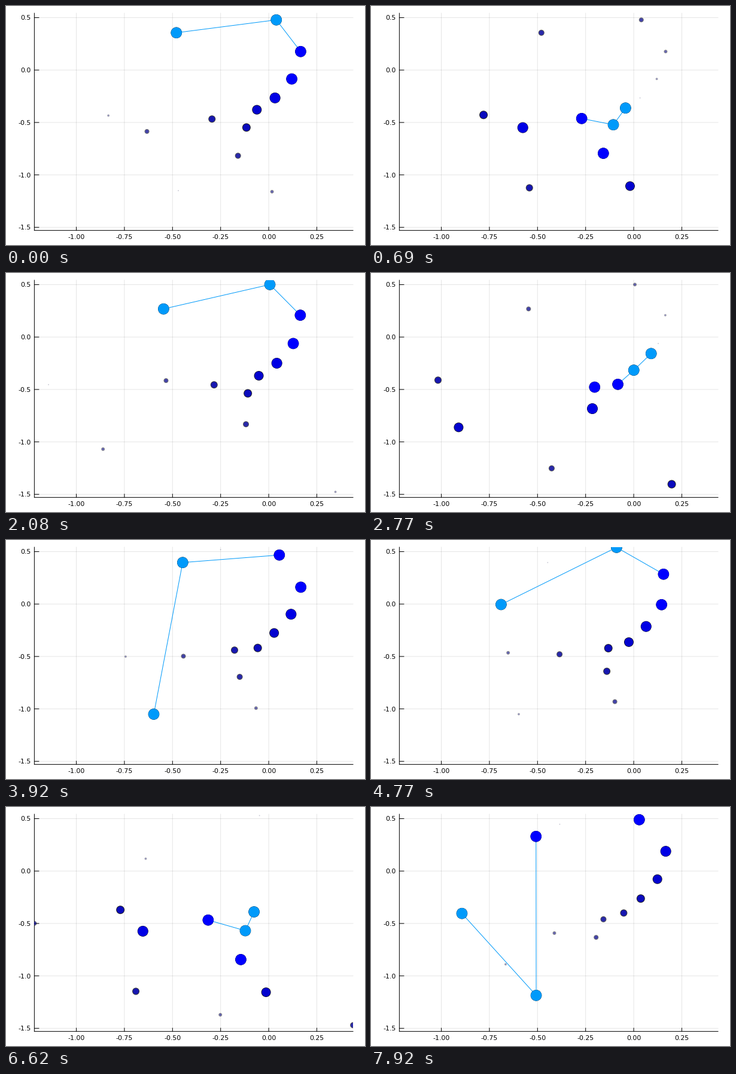
A matplotlib script that plays this animation: 600 by 400 pixels, repeating every 8 s.

```python
import numpy as np
import matplotlib.pyplot as plt
from matplotlib.animation import FuncAnimation
from matplotlib.patches import Rectangle

W, H, DPI = 600, 400, 100
STEPS, LOOP_MS, TICK_MS = 104, 8000, 20
TAIL = 13                                # points visible at once
LEFT, TOP, RIGHT, BOTTOM = 47.4, 12, 580, 375.6
ORIGIN = np.array([439.1, 107.2])        # pixel place of (0, 0)
SCALE = np.array([321.6, -175.45])       # pixels per unit
LIGHT, BLUE = (0, 154 / 255, 250 / 255), (0, 0, 1)
A, B, C, D = 0.9, -0.6013, 2.0, 0.5      # Tinkerbell map
PX = 72 / DPI

# Key points (step, x, y): the map fills in everything between them.
KEYS = [
    (-12, 288, 309), (-6, 402, 203), (0, 285, 45), (8, 425, 170.5),
    (13, 246.5, 75.5), (16, 550.5, 366), (25, 492, 70.5), (30, 502.5, 353.5),
    (36, 468, 135), (43, 391, 229), (51, 247, 291.5), (60, 489, 57),
    (65, 545, 330), (72, 484, 112), (79, 217, 308.5), (86, 414.5, 175.5),
    (94, 376, 218), (103, 152, 178),
]


def step(p):
    x, y = p
    return np.array([x * x - y * y + A * x + B * y,
                     2 * x * y + C * x + D * y])


def jacobian(p):
    x, y = p
    return np.array([[2 * x + A, -2 * y + B],
                     [2 * y + C, 2 * x + D]])


def fit_orbit(rounds=20, stiff=1e4):
    """Gauss-Newton: the orbit of the map that passes the key points."""
    count = STEPS + TAIL - 1
    keys = {k + TAIL - 1: ((x, y) - ORIGIN) / SCALE for k, x, y in KEYS}
    orbit = np.zeros((count, 2))
    for i in range(count):
        orbit[i] = keys[i] if i in keys else step(orbit[i - 1])

    rows = 2 * (count - 1)
    weight = np.abs(SCALE)
    for _ in range(rounds):
        mat = np.zeros((rows + 2 * len(keys), 2 * count))
        res = np.zeros(len(mat))
        for i in range(count - 1):
            r = slice(2 * i, 2 * i + 2)
            mat[r, 2 * i:2 * i + 2] = -stiff * jacobian(orbit[i])
            mat[r, 2 * i + 2:2 * i + 4] = stiff * np.eye(2)
            res[r] = stiff * (orbit[i + 1] - step(orbit[i]))
        for n, (i, p) in enumerate(keys.items()):
            r = slice(rows + 2 * n, rows + 2 * n + 2)
            mat[r, 2 * i:2 * i + 2] = np.diag(weight)
            res[r] = weight * (orbit[i] - p)
        orbit += np.linalg.lstsq(mat, -res, rcond=None)[0].reshape(-1, 2)
    return ORIGIN + SCALE * orbit


def disc_style(ages):
    """Sizes and colours: for each point a black disc, then its fill."""
    sizes, colors = [], []
    for age in ages:
        t = min(1, (TAIL - age) / 10)
        radius = min(9.3, 10 * t)
        ring = min(0.15 + 3 * (1 - t), 1, 0.4 * radius)
        fill = LIGHT if age < 2 else BLUE
        sizes += [(2 * r * PX) ** 2 for r in (radius, radius - ring)]
        colors += [(0, 0, 0, 1 - (1 - t) ** 1.6), (*fill, t)]
    return sizes, colors


def rule(x, y, alpha=1):
    ax.plot(x, y, color="black", alpha=alpha, lw=PX, zorder=1 + alpha)


def draw_axes():
    font = dict(family="DejaVu Sans", fontsize=11 * PX, va="baseline")
    for v in np.arange(-1, 0.26, 0.25):
        x = ORIGIN[0] + SCALE[0] * v
        rule([x, x], [TOP, BOTTOM], 0.1)
        rule([x, x], [BOTTOM, BOTTOM - 5.5])
        ax.text(x, 390.4, f"{v:.2f}", ha="center", **font)
    for v in np.arange(-1.5, 0.51, 0.5):
        y = ORIGIN[1] + SCALE[1] * v
        rule([LEFT, RIGHT], [y, y], 0.1)
        rule([LEFT, LEFT + 7.5], [y, y])
        ax.text(41.6, y + 4, f"{v:.1f}", ha="right", **font)
    rule([LEFT, LEFT], [TOP, BOTTOM])
    rule([LEFT, RIGHT], [BOTTOM, BOTTOM])


plt.rcParams["path.snap"] = False
fig = plt.figure(figsize=(W / DPI, H / DPI), dpi=DPI, facecolor="white")
ax = fig.add_axes([0, 0, 1, 1])
ax.set_xlim(0, W)
ax.set_ylim(H, 0)
ax.set_autoscale_on(False)
ax.axis("off")
draw_axes()

orbit = fit_orbit()
ages = [1, 0, *range(TAIL - 1, 1, -1)]   # drawing order
sizes, colors = disc_style(ages)
start = np.zeros(len(sizes))
link, = ax.plot([], [], color=LIGHT, lw=PX, zorder=3)
discs = ax.scatter(start, start, s=sizes, c=colors, linewidths=0, zorder=4)
clip = Rectangle((LEFT, TOP), RIGHT - LEFT, BOTTOM - TOP, transform=ax.transData)
for artist in (link, discs):
    artist.set_clip_path(clip)


def update(tick):
    now = int((tick + 0.5) * TICK_MS * STEPS / LOOP_MS)
    head = now + TAIL - 1
    link.set_data(*orbit[head - 2:head + 1].T)
    points = orbit[[head - age for age in ages]]
    discs.set_offsets(np.repeat(points, 2, axis=0))
    return link, discs


anim = FuncAnimation(fig, update, frames=LOOP_MS // TICK_MS, interval=TICK_MS,
                     repeat=True, cache_frame_data=False)
plt.show()
```
